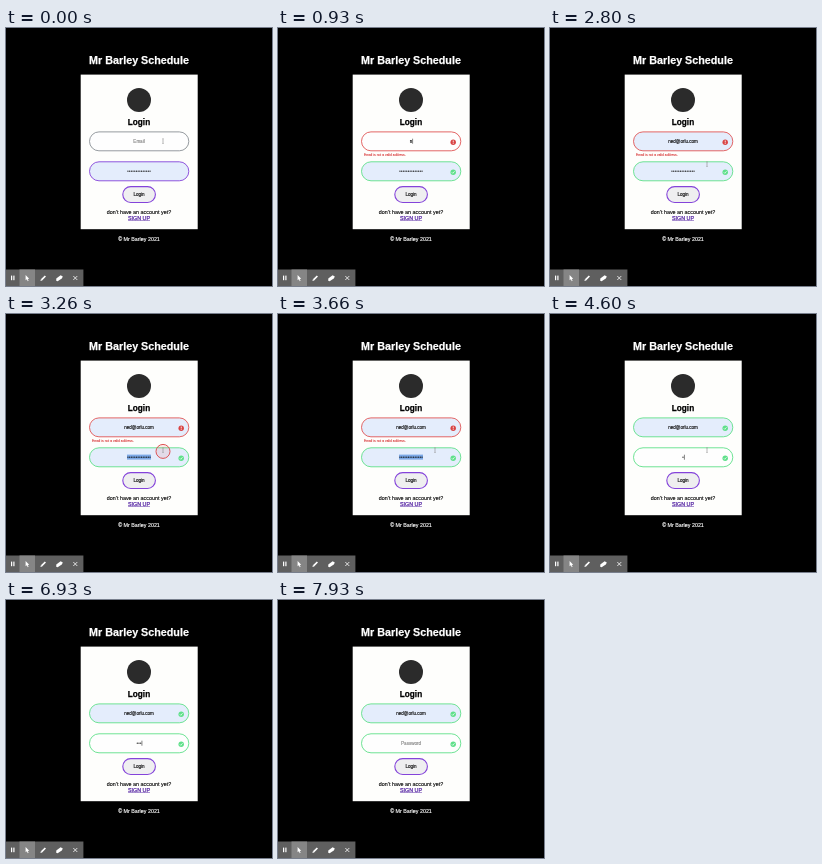
Write an HTML page with a canvas that moves like this. It is 266x258 px and loops after 8000 ms.

```html
<!DOCTYPE html>
<html lang="en">
<head>
<meta charset="utf-8">
<title>Login</title>
<style>
html, body { margin: 0; width: 100%; height: 100%; overflow: hidden; background: #000; }
canvas { display: block; width: 266px; height: 258px; }
</style>
</head>
<body>
<canvas id="stage"></canvas>
<script>
const W = 266, H = 258, LOOP = 8000, MID = 133;
const FONT = '"Liberation Sans", Arial, sans-serif';
const RED = '#e05555', GREEN = '#5fe08a', PURPLE = '#8443da', FILLED = '#e4edfc', INK = '#111';

const canvas = document.getElementById('stage');
const c = canvas.getContext('2d');
const dpr = window.devicePixelRatio || 1;
canvas.width = W * dpr;
canvas.height = H * dpr;

// [time, value] steps: the last one reached holds
const emailSteps = [[0, ''], [800, 'n'], [1200, 'ne'], [1530, 'ned'], [2130, 'ned@orlu.com']];
const dotSteps = [[0, 14], [4600, 1], [4800, 2], [5000, 3], [5130, 4], [5460, 5], [5730, 6], [5930, 7],
  [6130, 6], [6330, 5], [6530, 4], [6800, 3], [7130, 2], [7400, 1], [7660, 0]];

const stepAt = (steps, t) => steps.filter(s => s[0] <= t).pop()[1];
const clamp = x => Math.max(0, Math.min(1, x));
const ease = x => x * x * (3 - 2 * x);
const between = (t, a, b) => t >= a && t < b;

// A hairline outline gives the letters a medium weight
function text(str, x, y, size, color, { weight = 'normal', align = 'center', outline = .15 } = {}) {
  c.font = `${weight} ${size}px ${FONT}`;
  c.textAlign = align;
  c.fillStyle = c.strokeStyle = color;
  c.lineWidth = outline;
  c.lineJoin = 'round';
  c.fillText(str, x, y);
  if (outline) c.strokeText(str, x, y);
  return c.measureText(str).width;
}

function rect(x, y, w, h, color) {
  c.fillStyle = color;
  c.fillRect(x, y, w, h);
}

function disc(x, y, r, color) {
  c.fillStyle = color;
  c.beginPath();
  c.arc(x, y, r, 0, 7);
  c.fill();
}

function line(points, color, width) {
  c.strokeStyle = color;
  c.lineWidth = width;
  c.beginPath();
  points.forEach(([x, y]) => c.lineTo(x, y));
  c.stroke();
}

function shape(points, color) {
  c.fillStyle = color;
  c.beginPath();
  points.forEach(([x, y]) => c.lineTo(x, y));
  c.fill();
}

function pill(x, y, w, h, fill, stroke, width) {
  c.beginPath();
  c.roundRect(x, y, w, h, h / 2);
  c.fillStyle = fill;
  c.fill();
  c.strokeStyle = stroke;
  c.lineWidth = width;
  c.stroke();
}

function badge(y, ok) {
  disc(175.2, y, 2.7, ok ? GREEN : '#d94444');
  if (ok) {
    line([[173.8, y + .1], [174.8, y + 1.1], [176.6, y - 1]], '#fff', .7);
  } else {
    rect(174.8, y - 1.7, .8, 2, '#fff');
    rect(174.8, y + .9, .8, .8, '#fff');
  }
}

const caret = (x, y) => rect(x, y - 2.5, .6, 5, '#333');

function drawPage() {
  rect(0, 0, W, H, '#000');
  text('Mr Barley Schedule', MID, 36, 10.75, '#fff', { weight: 'bold', outline: .25 });
  rect(74.7, 46.6, 117, 154.6, '#fefefc');
  disc(MID, 72, 12, '#2b2b2b');
  text('Login', MID, 97, 8.2, '#000', { weight: 'bold', outline: .25 });
  pill(116.8, 158.6, 32.6, 15.9, '#efeff0', PURPLE, 1.1);
  text('Login', MID, 168.3, 4.6, INK);
  text("don't have an account yet?", MID, 186.3, 5.4, INK);
  text('SIGN UP', MID, 192, 5.4, '#5a2ba6', { outline: .25 });
  rect(122, 192.5, 22, .5, '#5a2ba6');
  text('© Mr Barley 2021', MID, 212.6, 5.35, '#fff');
}

function drawEmail(t) {
  const checked = t >= 800, valid = t >= 4600, value = stepAt(emailSteps, t);
  const border = !checked ? '#8b9096' : valid ? GREEN : RED;
  pill(83.5, 103.9, 99.3, 18.9, t >= 2130 ? FILLED : '#fefefe', border, .9);
  if (value) {
    const w = text(value, MID, 114.8, 4.5, INK);
    if (t < 2130) caret(MID + w / 2 + .2, 113.2);
  } else {
    text('Email', MID, 114.8, 4.5, '#888');
  }
  if (checked) badge(114.2, valid);
  if (checked && !valid) {
    text('Email is not a valid address.', 86, 128.2, 3.35, '#d93a3a', { align: 'left', outline: .1 });
  }
}

function drawPassword(t) {
  const typed = t >= 4600, n = stepAt(dotSteps, t), gap = 1.7, y = 143.2;
  pill(83.5, 133.8, 99.3, 19, typed ? '#fefefe' : FILLED, t < 800 ? PURPLE : GREEN, .9);
  if (between(t, 3200, 4600)) rect(121, 140.6, 24, 5, '#7ba8e6');
  for (let i = 0; i < n; i++) disc(MID + (i - (n - 1) / 2) * gap, y, .62, INK);
  if (!n) text('Password', MID, 144.8, 4.5, '#888');
  if (between(t, 4600, 7930)) caret(MID + n * gap / 2 + .1, y);
  if (t >= 800) badge(144.2, true);
}

function drawPointer(t) {
  const x = 157, y = 113.2 + 23 * ease(clamp((t - 1700) / 400));
  const ring = t < 3060 ? 0 : 1 - clamp((t - 3400) / 260);
  if (ring) {
    c.globalAlpha = ring;
    disc(x, 137.4, 7, 'rgba(225,60,60,.1)');
    c.strokeStyle = '#dc4545';
    c.lineWidth = .9;
    c.stroke();
    c.globalAlpha = 1;
  }
  if (t < 600 || between(t, 1660, 4660)) {
    rect(x - .3, y - 2.2, .6, 4.4, '#888');
    rect(x - .9, y - 2.6, 1.8, .5, '#999');
    rect(x - .9, y + 2.1, 1.8, .5, '#999');
  }
}

function drawToolbar() {
  rect(0, 241.5, 77.4, 16.5, '#5f5f5f');
  rect(13.5, 241.5, 15.5, 16.5, '#858585');
  rect(5, 247.6, 1.2, 4.6, '#fff');
  rect(7.3, 247.6, 1.2, 4.6, '#fff');
  shape([[19.6, 247], [19.6, 252.2], [20.8, 251.2], [21.8, 253.2], [22.6, 252.8], [21.7, 250.9], [23.2, 250.7]], '#fff');
  line([[35.5, 251.9], [39.4, 248]], '#fff', 1.7);
  shape([[34.4, 253], [34.9, 251.2], [36.2, 252.5]], '#fff');
  shape([[50.3, 250.4], [54.6, 247.2], [56.8, 248.4], [55.8, 250.6], [51.6, 253.3], [50.2, 252.8]], '#fff');
  line([[67.3, 248], [71.3, 252]], '#fff', .8);
  line([[71.3, 248], [67.3, 252]], '#fff', .8);
}

function draw(t) {
  c.setTransform(dpr, 0, 0, dpr, 0, 0);
  drawPage();
  drawEmail(t);
  drawPassword(t);
  drawPointer(t);
  drawToolbar();
}

let start;
function tick(now) {
  start ??= now;
  draw((now - start) % LOOP);
  requestAnimationFrame(tick);
}
draw(0);
requestAnimationFrame(tick);
</script>
</body>
</html>
```
